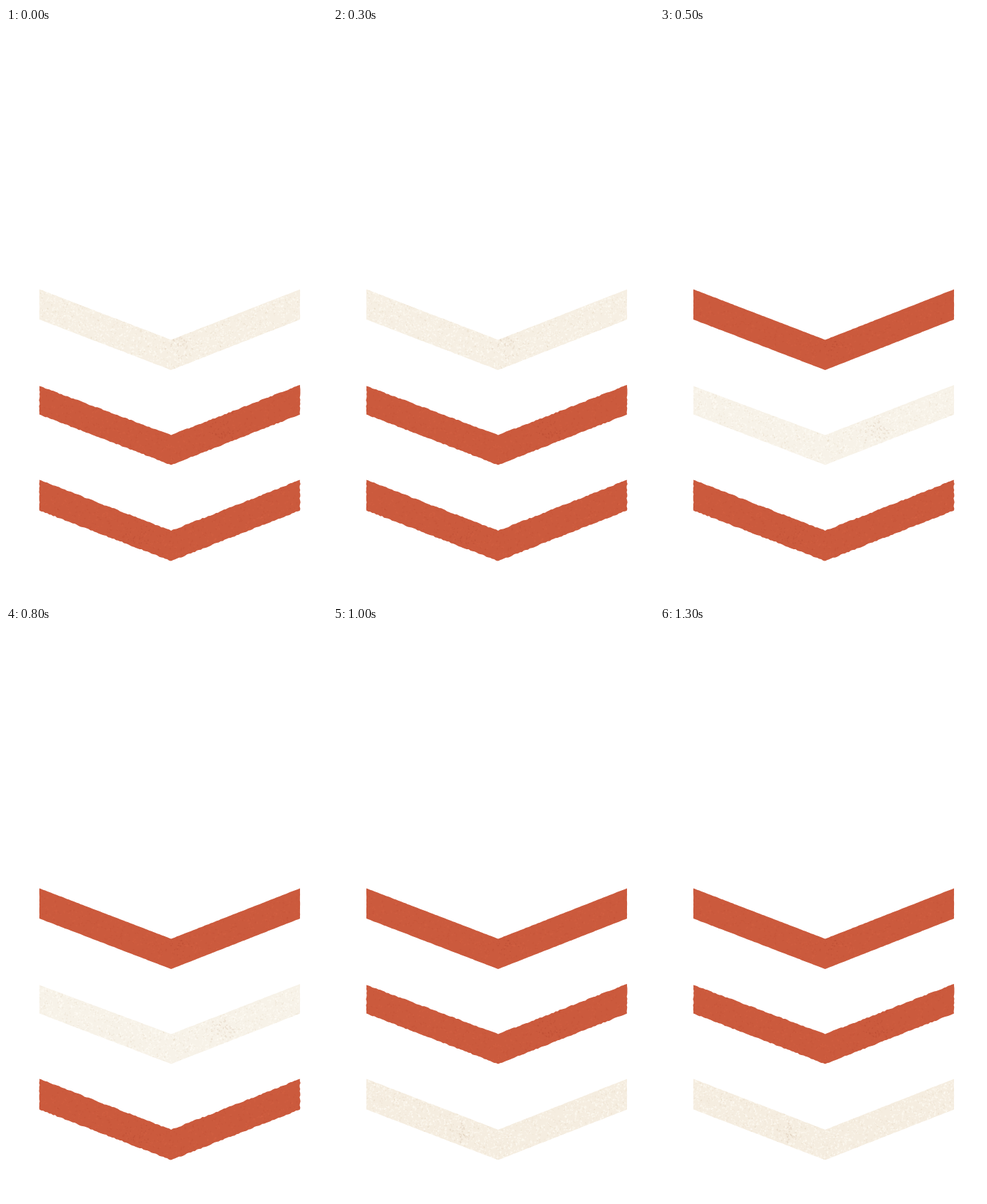
Recreate the animation shown at these times as an HTML page with a canvas. Size 452 by 803 pixels, loop 1.5 s.

```html
<!DOCTYPE html>
<html lang="en">
<head>
<meta charset="utf-8">
<title>Chevrons</title>
<style>
  html, body { margin: 0; width: 100%; height: 100%; overflow: hidden; background: #fff; }
  canvas { display: block; }
</style>
</head>
<body>
<canvas id="stage" width="452" height="803"></canvas>
<script>
const W = 452, H = 803, STEP = 500;
const LEFT = 47, MID = 232.5, RIGHT = 414;

// y values: outer top left/right, inner notch, outer bottom, tip
const rows = [
  { topL: 367.5, topR: 367.5, notch: 438.5, bottom: 410, tip: 481, rough: 0.15,
    cream: '#f6efe3', stain: [243, 447] },
  { topL: 503.5, topR: 502, notch: 572.5, bottom: 543.5, tip: 614.5, rough: 0.6,
    cream: '#f7f2e8', stain: [304, 567] },
  { topL: 635.5, topR: 635.5, notch: 707, bottom: 678.5, tip: 749.5, rough: 0.7,
    cream: '#f5ede0', stain: [184, 712] }
];

function randomizer(seed) {
  return () => {
    seed = (seed * 1664525 + 1013904223) >>> 0;
    return seed / 4294967296;
  };
}

function chevronPath(row, rough, random) {
  const corners = [
    [LEFT, row.topL], [MID, row.notch], [RIGHT, row.topR],
    [RIGHT, row.bottom], [MID, row.tip], [LEFT, row.bottom]
  ];
  const path = new Path2D();
  corners.forEach(([x, y], i) => {
    const [nx, ny] = corners[(i + 1) % corners.length];
    const pieces = Math.ceil(Math.hypot(nx - x, ny - y) / 3);
    for (let k = 0; k < pieces; k++) {
      const t = k / pieces, wobble = k ? (random() - 0.5) * 2 * rough : 0;
      const vertical = x === nx;
      path.lineTo(x + (nx - x) * t + (vertical ? wobble : 0),
                  y + (ny - y) * t + (vertical ? 0 : wobble));
    }
  });
  path.closePath();
  return path;
}

function scatter(g, row, random, count, color, size, spot) {
  g.fillStyle = color;
  for (let i = 0; i < count; i++) {
    let x, y;
    if (spot) {
      x = spot[0] + (random() + random() - 1) * 24;
      y = spot[1] + (random() + random() - 1) * 18;
    } else {
      x = LEFT + random() * (RIGHT - LEFT);
      const slope = 1 - Math.abs(x - MID) / (MID - LEFT);
      y = row.topL + slope * (row.notch - row.topL) + random() * 44;
    }
    g.beginPath();
    g.ellipse(x, y, size * (0.4 + random()), size * (0.3 + random() * 0.6),
              random() * Math.PI, 0, Math.PI * 2);
    g.fill();
  }
}

function renderChevron(row, index, isCream) {
  const layer = document.createElement('canvas');
  layer.width = W;
  layer.height = H;
  const g = layer.getContext('2d');
  const random = randomizer(index * 71 + (isCream ? 19 : 5));
  g.clip(chevronPath(row, isCream ? 0.25 : row.rough, random));
  g.fillStyle = isCream ? row.cream : '#cb5a3d';
  g.fillRect(0, 0, W, H);
  if (isCream) {
    scatter(g, row, random, 1100, 'rgba(255,253,247,0.45)', 1.4);
    scatter(g, row, random, 500, 'rgba(218,202,174,0.22)', 1.1);
    scatter(g, row, random, 40, 'rgba(205,184,155,0.3)', 1);
    scatter(g, row, random, 35, 'rgba(205,184,160,0.25)', 1.5, row.stain);
  } else {
    scatter(g, row, random, 450, 'rgba(220,108,74,0.16)', 1.5);
    scatter(g, row, random, 350, 'rgba(178,65,40,0.13)', 1.3);
    scatter(g, row, random, 28, 'rgba(168,62,40,0.28)', 1.2, row.stain);
  }
  return layer;
}

const layers = rows.map((row, i) => ({
  red: renderChevron(row, i, false),
  cream: renderChevron(row, i, true)
}));
const ctx = document.getElementById('stage').getContext('2d');
let shown = -1;

function draw(now) {
  const active = Math.floor(now / STEP) % rows.length;
  if (active !== shown) {
    shown = active;
    ctx.fillStyle = '#fff';
    ctx.fillRect(0, 0, W, H);
    layers.forEach((layer, i) => ctx.drawImage(i === active ? layer.cream : layer.red, 0, 0));
  }
}

let start = null;
function tick(now) {
  if (start === null) start = now;
  draw(now - start);
  requestAnimationFrame(tick);
}
draw(0);
requestAnimationFrame(tick);
</script>
</body>
</html>
```
